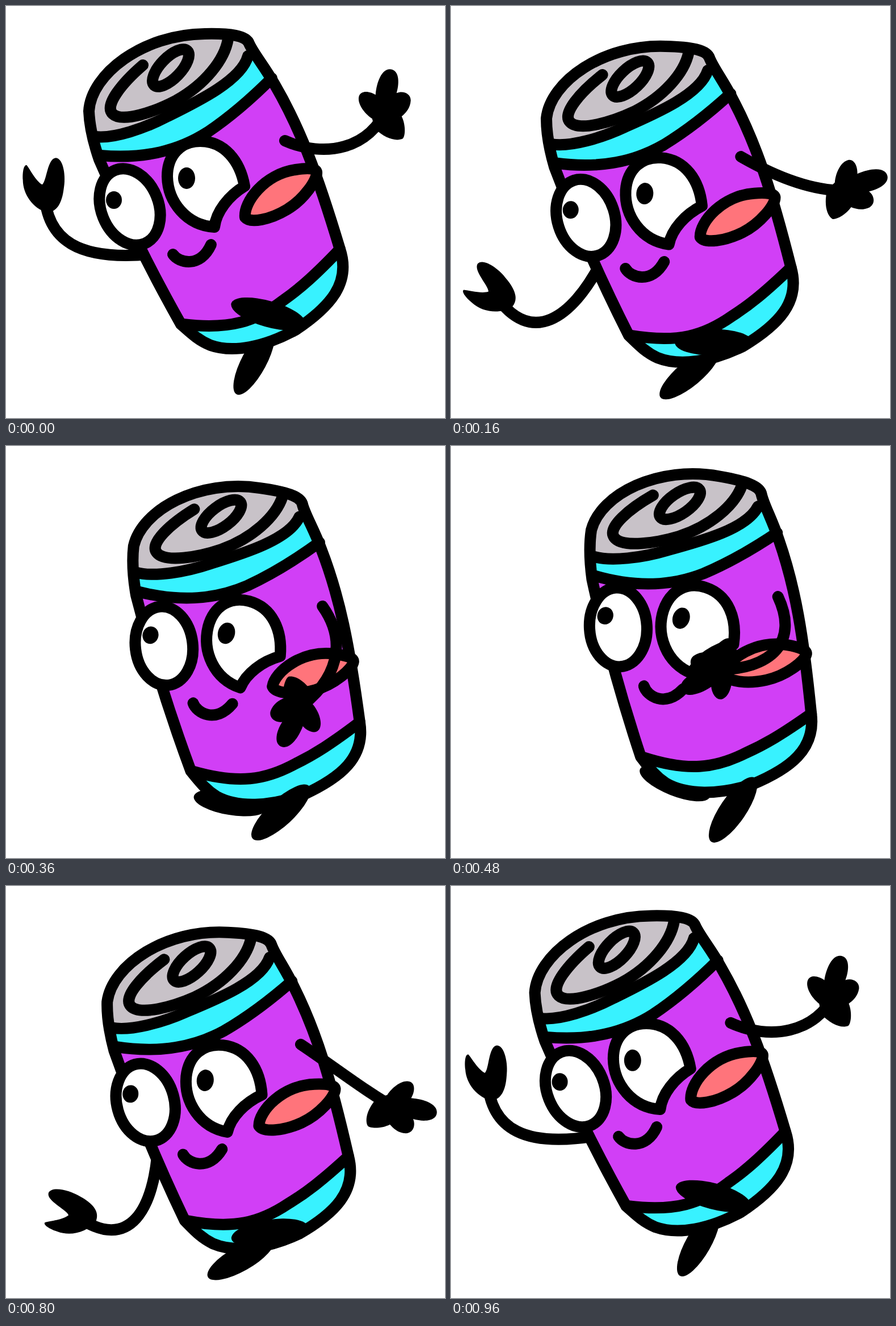
Recreate the animation shown at these times as an HTML page. Size 773x725 px, loop 1000 ms.

```html
<!DOCTYPE html>
<html lang="en">
<head>
<meta charset="utf-8">
<title>Running can</title>
<style>
  html, body { margin: 0; width: 100%; height: 100%; overflow: hidden; background: #fff; }
  svg { display: block; width: 100vw; height: 100vh; }
  .line { fill: none; stroke: #000; stroke-width: 20; stroke-linecap: round; stroke-linejoin: round; }
  .cyan { fill: #38f2ff; }
  .purple { fill: #d13ff6; }
  .grey { fill: #c8c2c8; }
  .line.white { fill: #fff; }
  .line.pink { fill: #ff747b; }
</style>
</head>
<body>
<svg viewBox="0 0 773 725">
  <path id="armL" class="line"/>
  <path id="handL" d="M4 37C-20 30 -38 5 -38 -20C-39 -35 -36 -48 -31 -46C-25 -38 -15 -18 -4 -12C4 -18 5 -58 20 -59C34 -58 38 -25 34 -5C31 20 22 37 4 37Z"/>
  <ellipse id="footL" rx="66" ry="22"/>

  <g id="can">
    <path class="cyan" d="M146 185L428 88L473 138L588 428C608 488 570 530 510 570C455 600 400 611 360 597C338 588 325 575 308 560L164 270Z"/>
    <path class="purple" d="M166 263C245 270 305 254 355 222C395 195 430 165 468 127L473 138C518 215 548 295 588 428C545 473 518 497 488 518C440 555 395 570 312 560C255 466 207 370 164 270Z"/>
    <path class="grey" d="M157 230C148 210 146 200 146 185C150 120 240 50 350 49C395 48 423 52 428 66L426 88C410 130 340 168 285 194C245 215 190 234 157 230Z"/>
    <path class="line" d="M157 230C190 234 245 215 285 194C340 167 415 130 426 88"/>
    <path class="line" d="M241 104C205 135 172 175 188 190C205 206 262 186 300 166C350 138 385 95 391 58"/>
    <ellipse class="line" stroke-width="22" rx="42" ry="18" transform="translate(290 109) rotate(-46)"/>
    <path class="line" d="M166 263C245 270 305 254 355 222C395 195 430 165 468 127"/>
    <path class="line" d="M312 560C395 570 440 555 488 518C518 497 545 473 588 428"/>
    <path class="line" d="M428 66C436 84 455 106 473 138C518 215 548 295 588 428C608 488 570 530 510 570C455 600 400 611 360 597C338 588 325 575 308 560C255 466 207 370 164 270C152 235 147 210 146 185C150 120 240 50 350 49C395 48 423 52 428 66Z"/>
  </g>

  <ellipse id="footR" rx="68" ry="23"/>

  <g id="face">
    <ellipse class="line white" rx="50.5" ry="69.5" transform="translate(218 353.5) rotate(-22)"/>
    <ellipse cx="190" cy="341.5" rx="14" ry="15.5"/>
    <path class="line white" d="M342 238C308 238 284 262 284 300C285 345 318 386 367 389C370 362 392 334 420 317C412 272 384 238 342 238Z"/>
    <ellipse cx="318" cy="303" rx="15" ry="19"/>
    <path class="line pink" d="M421 372C418 345 455 296 510 288C530 285 545 285 547 292C549 305 525 340 495 358C465 376 430 383 421 372Z"/>
    <path class="line" d="M294 437C304 452 342 462 361 420"/>
  </g>

  <path id="armR" class="line"/>
  <path id="handR" d="M-27 20C-42 10 -54 -8 -50 -20C-46 -31 -30 -28 -21 -22C-19 -45 -10 -67 4 -67C20 -67 22 -45 16 -25C28 -30 41 -24 41 -12C40 2 32 10 25 16C32 30 32 50 27 55C15 61 -5 54 -22 38Z"/>
</svg>
<script>
const LOOP = 1000, STEP = 40;
const $ = id => document.getElementById(id);

// Point at a distance and an angle in degrees from an origin
function polar([x, y], length, degrees) {
  const a = degrees * Math.PI / 180;
  return [x + length * Math.cos(a), y + length * Math.sin(a)];
}

function put(id, [x, y], angle, px = 0, py = 0) {
  $(id).setAttribute("transform", `translate(${x} ${y}) rotate(${angle}) translate(${-px} ${-py})`);
}

function drawArm(side, shoulder, bend1, bend2, reach, handAngle) {
  const [p, q, hand] = [bend1, bend2, reach].map(([length, angle]) => polar(shoulder, length, angle));
  $("arm" + side).setAttribute("d", `M${shoulder}C${p} ${q} ${hand}`);
  put("hand" + side, hand, handAngle);
}

function draw(t) {
  const a = t / LOOP * 2 * Math.PI;
  const sway = (1 - Math.cos(a)) / 2;   // one swing per loop
  const dip = Math.sin(a) ** 2;         // two bounces per loop
  const lag = 2.7 * Math.sin(2 * a);
  const drift = dip * Math.cos(a);

  const cx = 370, cy = 330, tilt = 11.1 * sway;
  const x = cx + 69.5 * sway - 3.6 * dip + 4.5 * drift;
  const y = cy + 1.9 * sway + 34.5 * dip - lag;
  put("can", [x, y], tilt, cx, cy);

  const fx = 254, fy = 322;
  put("face", [fx + 85 * sway + 6 * drift, fy - 22.8 * sway + 42 * dip - lag], 18.7 * sway, fx, fy);

  const onCan = (px, py) => {
    const dx = px - cx, dy = py - cy;
    return polar([x, y], Math.hypot(dx, dy), Math.atan2(dy, dx) * 180 / Math.PI + tilt);
  };
  drawArm("R", onCan(491, 237),
    [76 + 9 * sway - 14 * dip, 24 + 41 * sway - 5 * dip],
    [150 - 20 * sway, 6 + 87 * sway],
    [190 - 19 * sway + 27 * dip, -18 + 150 * sway],
    232 * sway + 10 * dip);
  drawArm("L", onCan(252, 437),
    [122 - 25 * dip, 175 - 170 * sway - 25 * dip],
    [183 + 12 * dip, 187 - 188 * sway - 20 * dip],
    [215 - 10 * sway - 28 * dip, 211 - 203 * sway],
    -165 * sway - 13 * dip);

  put("footR", [462 + 35 * sway - 11 * dip, 542 + 98 * sway + 38 * dip], 16 - 72 * sway);
  put("footL", [437 - 43 * sway - 10 * dip, 625 - 33 * sway + 45 * dip - lag], -62 + 84 * sway + 4 * dip);
}

function tick() {
  draw(Math.floor(performance.now() % LOOP / STEP) * STEP);
  requestAnimationFrame(tick);
}
tick();
</script>
</body>
</html>
```
